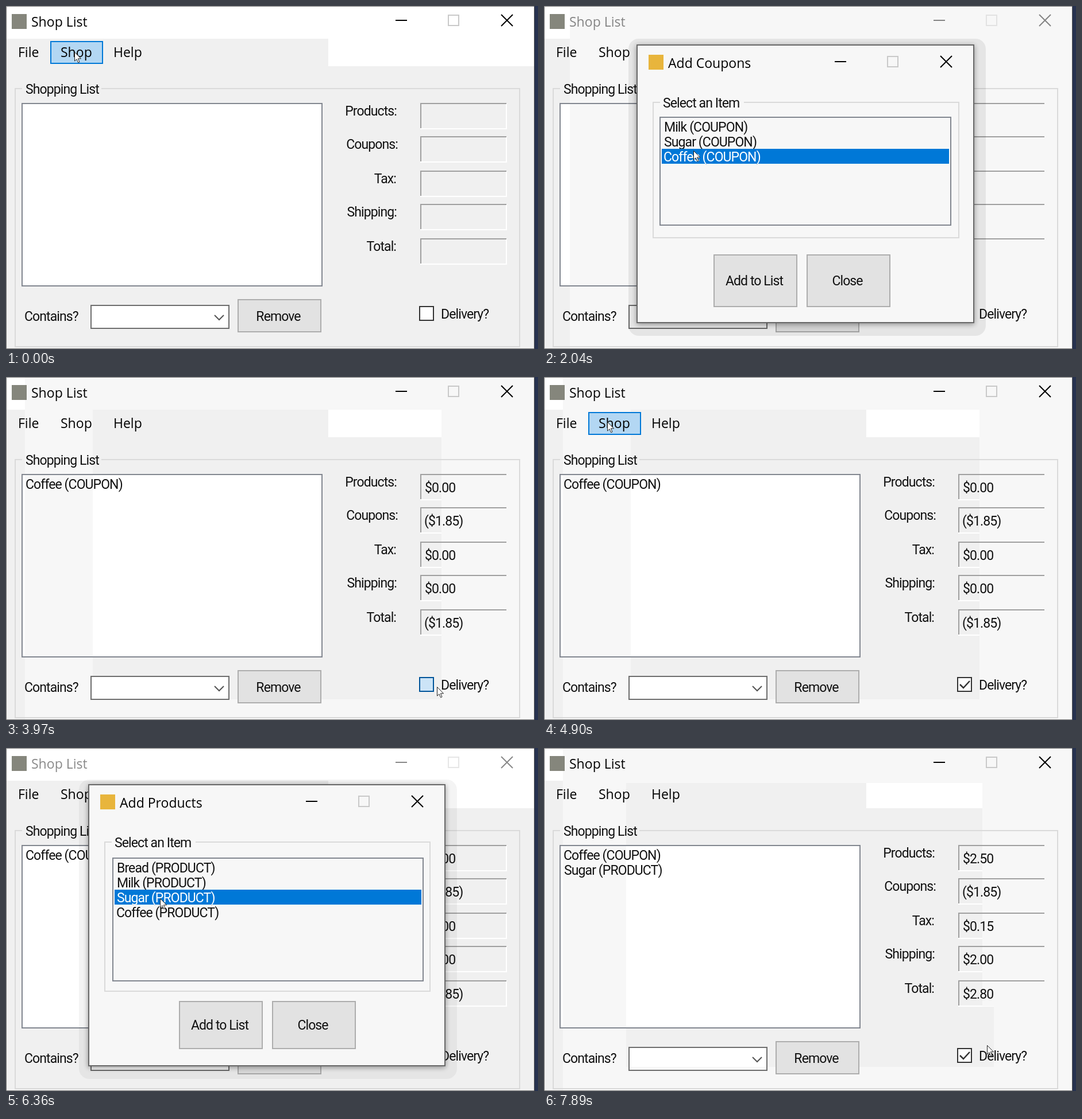
Write an HTML page that moves like this. It is 926 px wide and 598 px high and loops after 8000 ms.

```html
<!DOCTYPE html>
<html lang="en">
<head>
<meta charset="utf-8">
<title>Shop List</title>
<style>
  html, body { margin: 0; height: 100%; overflow: hidden; background: #f0f0f0; }
  svg { display: block; width: 100vw; height: 100vh; }
  text { font: 23px Roboto, sans-serif; letter-spacing: -.9px; fill: #111; white-space: pre; }
  .ui text, text.ui { font: 23px "Open Sans", sans-serif; letter-spacing: 0; fill: #000; }
  .labels text { text-anchor: end; }
  .btn rect { fill: #e2e2e2; stroke: #adadad; stroke-width: 2; }
  .btn text { text-anchor: middle; }
  .edge { fill: none; stroke: #828790; stroke-width: 2; }
  .group { fill: none; stroke: #dadada; stroke-width: 2; }
  .hot { fill: #b3d7f3; stroke: #0078d7; stroke-width: 2; }
  .haze { fill: #f7f7f7; fill-rule: evenodd; }
  .frame { fill: #f7f7f7; stroke: #686868; stroke-width: 2; }
  .shade { fill: #000; fill-opacity: .07; }
  .near { filter: drop-shadow(0 2px 5px #0006); }
  .pick rect { fill: #0078d7; }
  .pick text { fill: #fff; }

  /* Everything runs on one 8 s clock with hard steps. */
  [class*="t-"] { animation: 8s step-end -15ms infinite; }

  .t-title { animation-name: title; }
  @keyframes title {
    0%, 37.5%, 94.875% { opacity: 1; }
    15.375%, 72.75% { opacity: .47; }
  }
  .t-haze1 { animation-name: haze1; }
  @keyframes haze1 { 0%, 37.5% { opacity: 0; } 15.375% { opacity: 1; } }
  .t-haze2 { animation-name: haze2; }
  @keyframes haze2 { 0%, 72.75% { opacity: 0; } 37.5% { opacity: 1; } }
  .t-haze3 { animation-name: haze3; }
  @keyframes haze3 { 0% { opacity: 0; } 94.875% { opacity: 1; } }

  .t-tab { animation-name: tab; }
  @keyframes tab { 0%, 61.25% { opacity: 1; } 5.375%, 63.125% { opacity: 0; } }
  .t-menu { animation-name: menu; }
  @keyframes menu {
    0%, 15.375%, 72.75% { opacity: 0; }
    5.375%, 63.125% { opacity: 1; }
  }
  .t-item1 { animation-name: item1; }
  @keyframes item1 { 0%, 15.375%, 66.5% { opacity: 0; } 10.375%, 65% { opacity: 1; } }
  .t-item2 { animation-name: item2; }
  @keyframes item2 { 0%, 72.75% { opacity: 0; } 66.5% { opacity: 1; } }

  .t-coupon { animation-name: coupon; }
  @keyframes coupon { 0% { opacity: 0; } 30% { opacity: 1; } }
  .t-before { animation-name: before; }
  @keyframes before { 0%, 88% { opacity: 0; } 30% { opacity: 1; } }
  .t-product { animation-name: product; }
  @keyframes product { 0% { opacity: 0; } 88% { opacity: 1; } }

  .t-box { fill: #fff0; stroke: #333; stroke-width: 2; animation-name: box; }
  @keyframes box {
    0%, 53.375% { fill: #fff0; stroke: #333; }
    44.625%, 51.625% { fill: #fff0; stroke: #0078d7; }
    49.625% { fill: #cce4f7; stroke: #005499; }
  }
  .t-check { animation-name: check; }
  @keyframes check { 0% { opacity: 0; } 51.625% { opacity: 1; } }

  .t-dialog1 { transform-origin: 294px 180px; animation-name: dialog1; }
  @keyframes dialog1 {
    0%, 37.5% { opacity: 0; transform: none; }
    15.375%, 36% { opacity: .45; transform: scale(.97); }
    16.875% { opacity: 1; transform: none; }
  }
  .t-dialog2 { transform-origin: 276px 176px; animation-name: dialog2; }
  @keyframes dialog2 {
    0%, 94.875% { opacity: 0; transform: none; }
    72.75%, 93.75% { opacity: .45; transform: scale(.97); }
    74.25% { opacity: 1; transform: none; }
  }
  .t-pick1 { animation-name: pick1; }
  @keyframes pick1 { 0% { opacity: 0; } 25.5% { opacity: 1; } }
  .t-pick2 { animation-name: pick2; }
  @keyframes pick2 { 0% { opacity: 0; } 79.5% { opacity: 1; } }

  .t-add1 { animation-name: add1; }
  @keyframes add1 {
    0%, 31.5% { fill: #e2e2e2; stroke: #adadad; }
    28.5% { fill: #e5f1fb; stroke: #0078d7; }
    30% { fill: #cce4f7; stroke: #005499; }
  }
  .t-close1 { animation-name: close1; }
  @keyframes close1 {
    0% { fill: #e2e2e2; stroke: #adadad; }
    33% { fill: #e5f1fb; stroke: #0078d7; }
    34.5% { fill: #cce4f7; stroke: #005499; }
  }
  .t-add2 { animation-name: add2; }
  @keyframes add2 {
    0%, 89.625% { fill: #e2e2e2; stroke: #adadad; }
    84.75% { fill: #e5f1fb; stroke: #0078d7; }
    86.375% { fill: #cce4f7; stroke: #005499; }
  }
  .t-close2 { animation-name: close2; }
  @keyframes close2 {
    0% { fill: #e2e2e2; stroke: #adadad; }
    91.25% { fill: #e5f1fb; stroke: #0078d7; }
    92.5% { fill: #cce4f7; stroke: #005499; }
  }

  .t-cursor { fill: #fff; stroke: #222; animation-name: cursor; }
  @keyframes cursor {
    0% { transform: translate(119px, 80px); }
    8.875% { transform: translate(138px, 98px); }
    10.375% { transform: translate(150px, 113px); }
    18.75% { transform: translate(220px, 230px); }
    20.25% { transform: translate(343px, 323px); }
    22.125% { transform: translate(246px, 284px); }
    25.5% { transform: translate(260px, 252px); }
    27% { transform: translate(310px, 365px); }
    28.5% { transform: translate(366px, 476px); }
    31.5% { transform: translate(450px, 482px); }
    33% { transform: translate(528px, 478px); }
    37.5% { transform: translate(641px, 467px); }
    39.375% { transform: translate(690px, 500px); }
    41.125% { transform: translate(725px, 528px); }
    42.75% { transform: translate(745px, 538px); }
    44.625% { transform: translate(750px, 540px); }
    53.375% { transform: translate(690px, 480px); }
    55% { transform: translate(520px, 360px); }
    56.625% { transform: translate(330px, 220px); }
    58.25% { transform: translate(150px, 110px); }
    59.75% { transform: translate(56px, 60px); }
    61.25% { transform: translate(110px, 78px); }
    65% { transform: translate(145px, 120px); }
    66.5% { transform: translate(162px, 152px); }
    69.625% { transform: translate(168px, 162px); }
    76.125% { transform: translate(225px, 225px); }
    78% { transform: translate(268px, 262px); }
    83.25% { transform: translate(320px, 370px); }
    84.75% { transform: translate(372px, 478px); }
    89.625% { transform: translate(455px, 482px); }
    91.25% { transform: translate(534px, 478px); }
    94.875% { transform: translate(590px, 470px); }
    96.75% { transform: translate(690px, 498px); }
    98.625% { transform: translate(771px, 518px); }
  }
</style>
</head>
<body>
<svg viewBox="0 0 926 598">
  <defs>
    <g id="controls" fill="none" stroke="#000" stroke-width="2">
      <path d="M0 0H20"/>
      <rect x="92" y="-9" width="18" height="18" stroke="#c9c9c9"/>
      <path d="M184-10l20 20m0-20l-20 20"/>
    </g>
    <path id="light" d="M0 45H150V1" fill="none" stroke="#fff" stroke-width="2"/>
    <path id="dark" d="M1 44V1H150" fill="none" stroke="#a0a0a0" stroke-width="2"/>
  </defs>

  <!-- Surfaces -->
  <rect width="926" height="598" fill="#f0f0f0"/>
  <path d="M1 1H919V105H561V57H1Z" fill="#fff"/>
  <path d="M28 170H550V488H28ZM148 522H388V562H148ZM720 524H744V548H720Z" fill="#fff"/>
  <use href="#light" x="721" y="169"/>
  <use href="#light" x="721" y="227"/>
  <use href="#light" x="721" y="287"/>
  <use href="#light" x="721" y="345"/>
  <use href="#light" x="721" y="405"/>
  <path class="haze t-haze1" d="M45 1H919V597H45Z"/>
  <path class="haze t-haze2" d="M33 1H919V597H33ZM151 57H758V562H151Z"/>
  <path class="haze t-haze3" d="M33 1H919V597H33ZM143 61H763V450H783V556H143Z"/>

  <!-- Main window -->
  <rect x="10" y="14" width="26" height="26" fill="#85867c"/>
  <g class="ui t-title">
    <text x="44" y="36">Shop List</text>
    <use href="#controls" x="678" y="25"/>
  </g>
  <path class="group" d="M28 144H16V594H894V144H166"/>
  <text x="34" y="153">Shopping List</text>
  <rect class="edge" x="28" y="170" width="522" height="318"/>
  <text class="t-coupon" x="34" y="195">Coffee (COUPON)</text>
  <text class="t-product" x="35" y="221">Sugar (PRODUCT)</text>

  <g class="labels">
    <text x="680" y="191">Products:</text>
    <text x="682" y="249">Coupons:</text>
    <text x="679" y="309">Tax:</text>
    <text x="680" y="367">Shipping:</text>
    <text x="679" y="427">Total:</text>
  </g>
  <use href="#dark" x="721" y="169"/>
  <use href="#dark" x="721" y="227"/>
  <use href="#dark" x="721" y="287"/>
  <use href="#dark" x="721" y="345"/>
  <use href="#dark" x="721" y="405"/>
  <text class="t-coupon" x="728" y="259">($1.85)</text>
  <g class="t-before">
    <text x="729" y="201">$0.00</text>
    <text x="729" y="319">$0.00</text>
    <text x="729" y="377">$0.00</text>
    <text x="728" y="437">($1.85)</text>
  </g>
  <g class="t-product">
    <text x="729" y="201">$2.50</text>
    <text x="729" y="319">$0.15</text>
    <text x="729" y="377">$2.00</text>
    <text x="729" y="437">$2.80</text>
  </g>

  <text x="32" y="549">Contains?</text>
  <rect class="edge" x="148" y="522" width="240" height="40" style="stroke:#6e6e6e"/>
  <path d="M363 539l8 8 8-8" fill="none" stroke="#555" stroke-width="2"/>
  <g class="btn">
    <rect x="404" y="512" width="144" height="56"/>
    <text x="474" y="549">Remove</text>
  </g>
  <rect class="t-box" x="720" y="524" width="24" height="24"/>
  <path class="t-check" d="M724 536l6 6 11-12" fill="none" stroke="#333" stroke-width="2.5"/>
  <text x="757" y="545">Delivery?</text>

  <!-- Menu -->
  <rect class="hot t-tab" x="78" y="62" width="90" height="38"/>
  <g class="t-menu">
    <path d="M78 62H168V100H322V194H78Z" fill="#fdfdfd" stroke="#808080" stroke-width="2"
      style="filter:drop-shadow(4px 4px 2px #0008)"/>
    <rect class="hot t-item1" x="82" y="104" width="236" height="42"/>
    <rect class="hot t-item2" x="82" y="148" width="236" height="42"/>
    <text class="ui" x="149" y="133">Coupons</text>
    <text class="ui" x="149" y="177">Products</text>
  </g>
  <g class="ui">
    <text x="21" y="89">File</text>
    <text x="95" y="89">Shop</text>
    <text x="187" y="89">Help</text>
  </g>

  <!-- Coupons dialog -->
  <g class="t-dialog1">
    <rect class="shade" x="147" y="57" width="622" height="518" rx="18"/>
    <rect class="frame near" x="162" y="68" width="586" height="484"/>
    <rect x="182" y="85" width="26" height="26" fill="#e8b53c"/>
    <text class="ui" x="216" y="108">Add Coupons</text>
    <use href="#controls" x="506" y="97"/>
    <path class="group" d="M202 168H190V404H722V168H348"/>
    <text x="207" y="177">Select an Item</text>
    <rect class="edge" x="202" y="194" width="506" height="188"/>
    <text x="209" y="219">Milk (COUPON)</text>
    <text x="209" y="245">Sugar (COUPON)</text>
    <text x="208" y="271">Coffee (COUPON)</text>
    <g class="pick t-pick1">
      <rect x="205" y="249" width="500" height="26"/>
      <text x="208" y="271">Coffee (COUPON)</text>
    </g>
    <g class="btn">
      <rect class="t-add1" x="296" y="434" width="144" height="90"/>
      <text x="366" y="487">Add to List</text>
      <rect class="t-close1" x="458" y="434" width="144" height="90"/>
      <text x="528" y="487">Close</text>
    </g>
  </g>

  <!-- Products dialog -->
  <g class="t-dialog2">
    <rect class="shade" x="127" y="55" width="658" height="522" rx="18" style="fill-opacity:.045"/>
    <rect class="frame near" x="144" y="64" width="620" height="490"/>
    <rect x="164" y="81" width="26" height="26" fill="#e8b53c"/>
    <text class="ui" x="198" y="104">Add Products</text>
    <use href="#controls" x="522" y="93"/>
    <path class="group" d="M184 164H172V424H738V164H330"/>
    <text x="189" y="173">Select an Item</text>
    <rect class="edge" x="186" y="192" width="540" height="214"/>
    <text x="193" y="217">Bread (PRODUCT)</text>
    <text x="193" y="243">Milk (PRODUCT)</text>
    <text x="193" y="269">Sugar (PRODUCT)</text>
    <text x="192" y="295">Coffee (PRODUCT)</text>
    <g class="pick t-pick2">
      <rect x="189" y="247" width="534" height="26"/>
      <text x="193" y="269">Sugar (PRODUCT)</text>
    </g>
    <g class="btn">
      <rect class="t-add2" x="302" y="442" width="144" height="82"/>
      <text x="372" y="491">Add to List</text>
      <rect class="t-close2" x="464" y="442" width="144" height="82"/>
      <text x="534" y="491">Close</text>
    </g>
  </g>

  <path class="t-cursor" d="M.5.5V16l3.500-3.300 2.600 6 2.400-1-2.600-5.900H11.500Z"/>

  <!-- Window border and desktop edge -->
  <path d="M.5 598V.5H919M0 597.500H919" fill="none" stroke="#6b6b6b"/>
  <rect x="919" width="7" height="598" fill="#27324f"/>
  <path d="M919.500 0V598" stroke="#555"/>
</svg>
</body>
</html>
```
